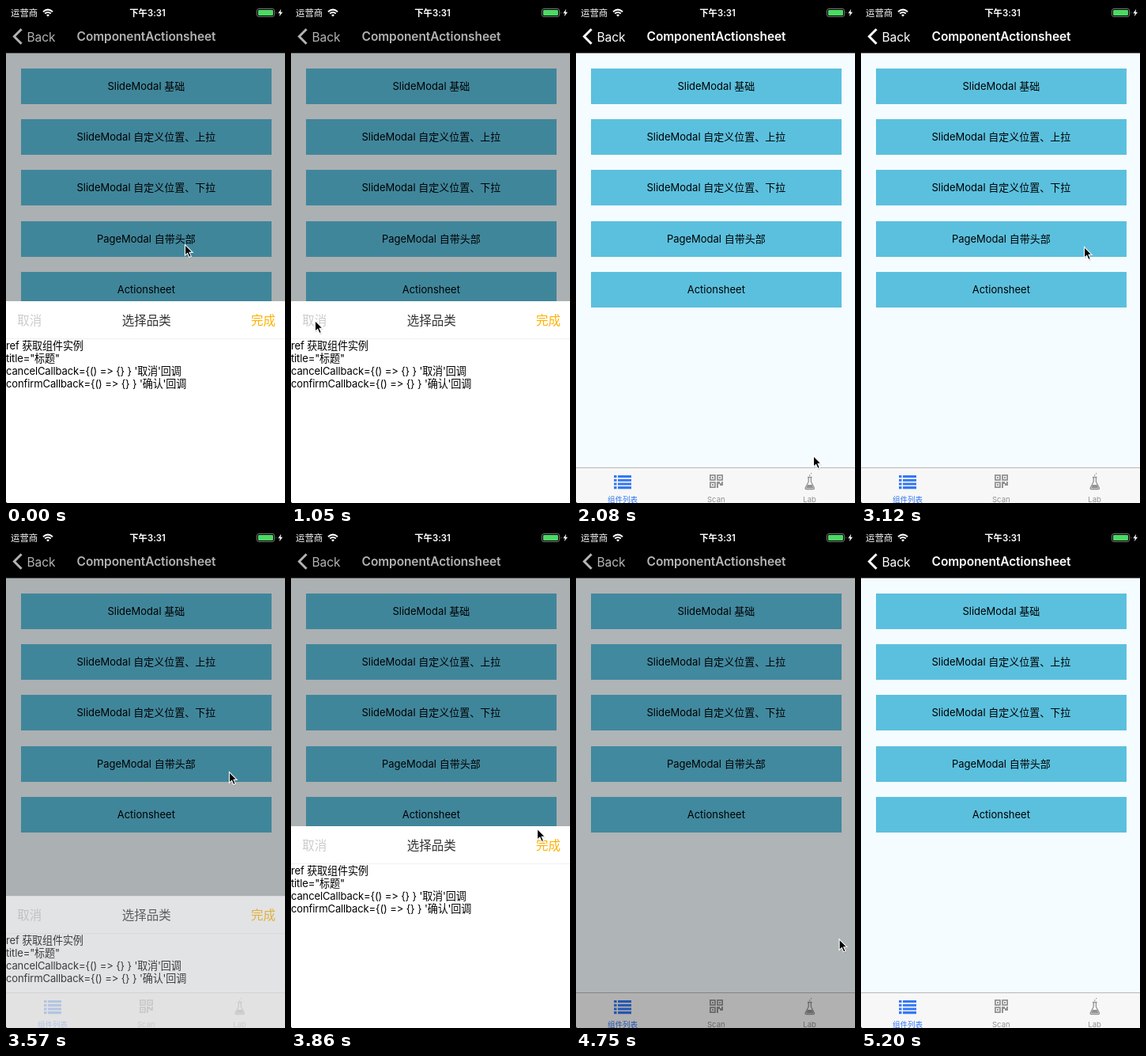
Write an HTML page that moves like this. It is 353 by 628 pixels and loops after 5.65 s.

```html
<!DOCTYPE html>
<html lang="zh">
<head>
<meta charset="utf-8">
<style>
  html, body { margin: 0; width: 100%; height: 100%; overflow: hidden; background: #f5fcff; }
  svg { display: block; width: 353px; height: 628px; }
  text {
    font: 13px Inter, "Noto Sans CJK SC", "Noto Sans CJK", sans-serif;
    font-feature-settings: "calt" 0;
    white-space: pre;
  }
  .mid { text-anchor: middle; }
  .nav text { font-size: 15.5px; fill: #fff; }
  .nav .title { font-weight: 600; letter-spacing: -.1px; }
  .status text { font-size: 11.4px; fill: #fff; }
  .status .clock { font-weight: 600; }
  .tabs text { font-size: 9.5px; }
  .head text { font-size: 15.5px; }
  .body text { font-size: 13.1px; letter-spacing: -.17px; }
</style>
</head>
<body>
<svg viewBox="0 0 353 628">
  <rect width="353" height="628" fill="#f5fcff"/>
  <g id="buttons"></g>

  <g class="nav">
    <rect width="353" height="59.5"/>
    <path d="M19.6 29.3l-9.2 9.2l9.2 9.2" fill="none" stroke="#fff" stroke-width="3"/>
    <text x="26.4" y="44.6">Back</text>
    <text class="title mid" x="177.5" y="44.4">ComponentActionsheet</text>
  </g>

  <g class="tabs" fill="#929292">
    <rect y="583" width="353" height="45" fill="#f7f7f7"/>
    <rect y="583" width="353" height="1" fill="#b8b8b8"/>
    <g id="list" fill="#3478f6">
      <text class="mid" x="59" y="627">组件列表</text>
    </g>
    <path d="M169.9 592.9h6v6h-6zM179.1 592.9h6v6h-6zM169.9 602.1h6v6h-6z" fill="none" stroke="#929292" stroke-width="1.8"/>
    <path d="M172 595h2v2h-2zM181 595h2v2h-2zM172 604h2v2h-2zM178 601h4v2h2v-2h2v5h-4v-2h-2v5h-2z"/>
    <text class="mid" x="177.3" y="626.6">Scan</text>
    <path d="M293 595.5h5.6M294.2 596v5.2L290.2 609Q289.8 610.6 291.4 610.6h8.8Q301.8 610.6 301.4 609L297.4 601.2V596M295 593h1.3M297 590.7h1.2" fill="none" stroke="#929292" stroke-width="1.3"/>
    <path d="M293 605h5.6l2 4.5h-9.6z"/>
    <text class="mid" x="295.6" y="626.6">Lab</text>
  </g>

  <rect id="dim" width="353" height="628"/>

  <g class="status">
    <text x="6" y="13">运营商</text>
    <path d="M47 7.2q6-5.2 12 0M49.2 9.6q3.8-3.2 7.6 0" fill="none" stroke="#fff" stroke-width="2"/>
    <path d="M53 13.4l-2-2.2q2-1.6 4 0z" fill="#fff"/>
    <text class="clock mid" x="179" y="13">下午3:31</text>
    <rect x="317.5" y="3.5" width="22" height="10" rx="2.4" fill="none" stroke="#777"/>
    <rect x="319" y="5" width="19" height="7" rx="1.2" fill="#4cd964"/>
    <path d="M341 7q1.6 1.5 0 3z" fill="#777"/>
    <path d="M348.2 3.8l-3.9 5.4h2.5l-1 4l4.2-5.5h-2.6z" fill="#fff"/>
  </g>

  <g id="sheet">
    <rect y="373" width="353" height="256" fill="#fff"/>
    <rect y="420" width="353" height="1" fill="#f0f0f0"/>
    <g class="head">
      <text x="14.3" y="402.5" fill="#ccc">取消</text>
      <text class="mid" x="177.7" y="402.5" fill="#333">选择品类</text>
      <text id="done" x="341" y="402.5" text-anchor="end" fill="#ffb000">完成</text>
    </g>
    <g class="body">
      <text y="434">ref 获取组件实例</text>
      <text y="450">title="标题"</text>
      <text y="466">cancelCallback={() =&gt; {} } '取消'回调</text>
      <text y="482">confirmCallback={() =&gt; {} } '确认'回调</text>
    </g>
  </g>

  <path d="M0 626.2Q.4 627.6 1.8 628H0z"/>
  <g id="cursor">
    <path d="M1 1.5v14l3.3-3l2.4 5.5l2.3-1l-2.3-5.5h4.3z" opacity=".22"/>
    <path d="M.5 .5v13.7l3.2-2.9l2.3 5.3l2.4-1l-2.3-5.2h4.1z" stroke="#fff" stroke-width="1.1"/>
  </g>
</svg>
<script>
const $ = id => document.getElementById(id);
const set = (id, name, value) => $(id).setAttribute(name, value);

const LOOP = 5650, STEP = 148.3;               // the screen refreshes once per step
const SHEET_HEIGHT = 255, SLIDE = 280, FADE = 300;
const CLOSE = 1200, OPEN = 3390, CONFIRM = 4430;

$('buttons').innerHTML = ['SlideModal 基础', 'SlideModal 自定义位置、上拉', 'SlideModal 自定义位置、下拉',
  'PageModal 自带头部', 'Actionsheet'].map((label, i) => {
    const y = Math.round(78.7 + i * 64.3);
    return `<rect x="19" y="${y}" width="317" height="45" fill="#5bc0de"/>
      <text class="mid" x="177.3" y="${y + 27}">${label}</text>`;
  }).join('');

for (let i = 0; i < 4; i++)
  $('list').innerHTML += `<path d="M48 ${593 + i * 4.7}h3.5v3.1h-3.5zm5 0h17v3.1h-17z"/>`;

const ramp = (t, from, length) => Math.min(1, Math.max(0, (t - from) / length));
const smooth = k => k * k * (3 - 2 * k);
const easeOut = k => 1 - (1 - k) ** 3;
const slide = (t, from) => smooth(ramp(t, from, SLIDE));

// Pointer strokes: start, end, destination, downward bend.
const strokes = [
  [380, 1050, 30, 397, 45],
  [1490, 2070, 300, 568, 0],
  [2080, 2760, 282, 304, 0],
  [3700, 4160, 323, 405, 0],
  [4600, 5200, 340, 600, 0]
];

function pointer(t) {
  let x = 226, y = 301;
  for (const [from, to, x1, y1, bend] of strokes) {
    const k = easeOut(ramp(t, from, to - from));
    x += (x1 - x) * k;
    y += (y1 - y) * k + bend * Math.sin(Math.PI * k);
  }
  return [x, y];
}

function draw(now) {
  const t = Math.floor(now % LOOP / STEP) * STEP;
  const shown = 1 - slide(t, CLOSE) + slide(t, OPEN) - slide(t, CONFIRM);
  const dim = 1 - ramp(t, CLOSE + FADE, FADE) + ramp(t, OPEN, FADE / 2) - ramp(t, CONFIRM + FADE, FADE);
  set('sheet', 'transform', `translate(0 ${(1 - shown) * SHEET_HEIGHT})`);
  set('sheet', 'opacity', shown);
  set('dim', 'opacity', dim * .3);
  set('done', 'opacity', t > CONFIRM ? .7 : 1);
  set('cursor', 'transform', `translate(${pointer(t)})`);
  set('cursor', 'opacity', t < 5150 ? 1 : 0);
}

const start = performance.now();
(function loop() {
  draw(performance.now() - start);
  requestAnimationFrame(loop);
})();
</script>
</body>
</html>
```
